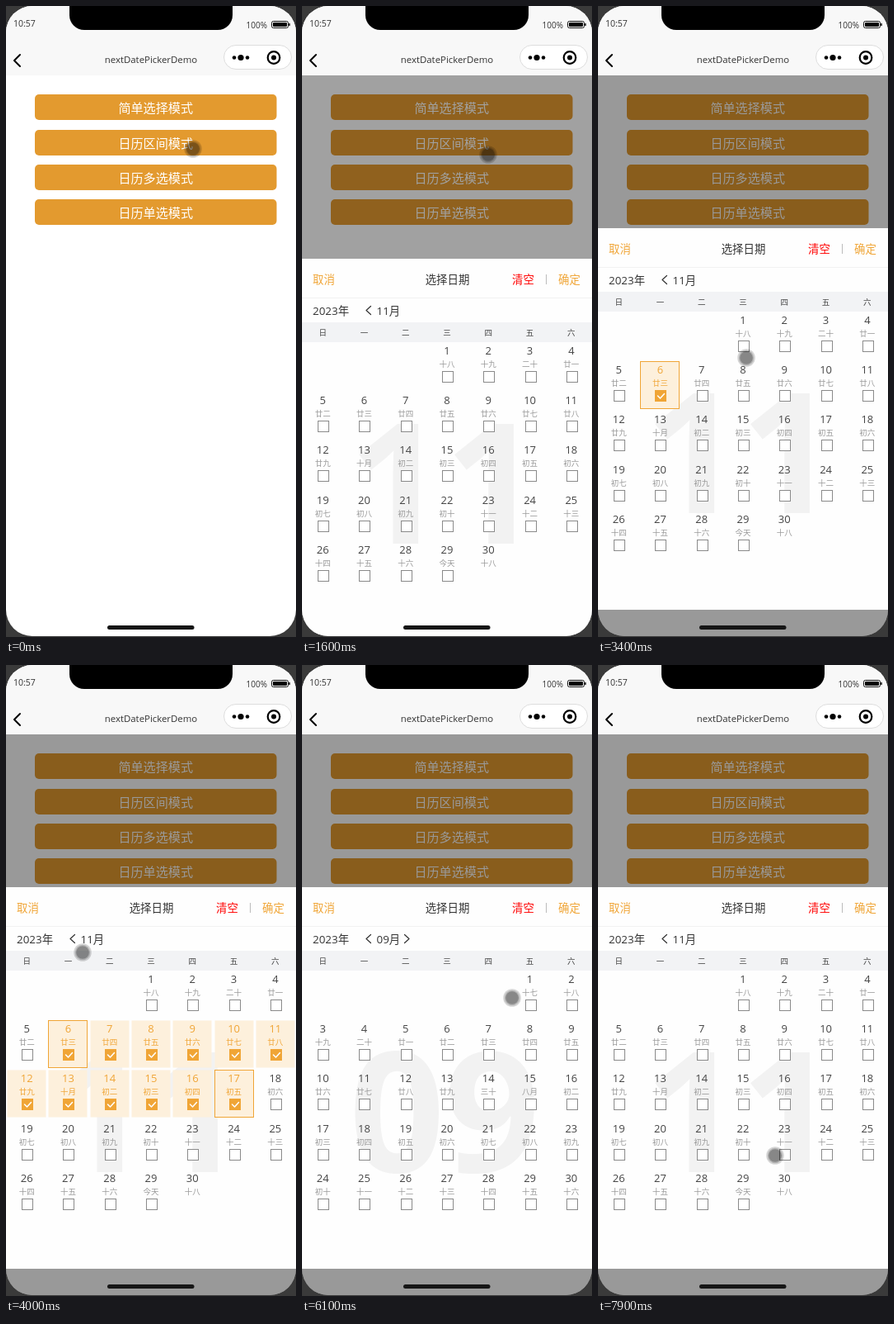
Animation of 352x764 px, one loop 8000 ms. Source, as an HTML page:

```html
<!DOCTYPE html>
<html lang="zh-CN">
<head>
<meta charset="utf-8">
<title>nextDatePickerDemo</title>
<style>
  html, body { margin: 0; width: 100%; height: 100%; overflow: hidden; background: #3a3a3a; }
  svg { display: block; width: 100vw; height: 100vh; }
  text { font-family: "Open Sans", "Noto Sans CJK SC", "Noto Sans CJK", sans-serif; fill: #333; }
  .mid { text-anchor: middle; }
  .btn { font-size: 15.1px; fill: #fff; }
  .act { font-size: 13.4px; }
  .week { font-size: 9.5px; fill: #444; }
  .day { font-size: 13px; fill: #444; }
  .lunar { font-size: 9.5px; fill: #999; }
  .mark { font-size: 203px; font-weight: 700; fill: #f2f2f2; }
  .box { fill: #fff; stroke: #8a8a8a; }
  .on .day, .on .lunar, .gold { fill: #f0a536; }
  .on .box { fill: #f0a536; stroke: #f0a536; }
  .clear { fill: #f00; font-weight: 500; }
  .cell { fill: #fdf0dc; }
  .end .cell { stroke: #f0a536; }
  .line { fill: none; stroke-linecap: round; stroke-linejoin: round; }
</style>
</head>
<body>
<svg viewBox="0 0 352 764" preserveAspectRatio="none">
  <defs><clipPath id="screen"><rect width="352" height="763" rx="32"/></clipPath></defs>
  <g clip-path="url(#screen)">
    <rect width="352" height="764" fill="#fff"/>
    <g id="buttons"></g>
    <rect id="shade" y="84" width="352" height="680" opacity="0"/>

    <g id="sheet">
      <rect y="269" width="352" height="462" fill="#fefefe"/>
      <text class="act gold" x="13" y="299">取消</text>
      <text class="act mid" x="176.5" y="298.5">选择日期</text>
      <text class="act clear" x="255" y="299">清空</text>
      <path d="M296.5 288v12" stroke="#bbb"/>
      <text class="act gold" x="311" y="299">确定</text>
      <path d="M0 316.5h352" stroke="#f2f2f2"/>
      <text class="act" x="13" y="337">2023年</text>
      <path class="line" d="M83.5 326.500l-5.500 5 5.500 5" stroke="#333" stroke-width="1.2"/>
      <text class="act" id="month" x="90.5" y="337"></text>
      <path class="line" id="next" d="M124.500 326.500l5.500 5-5.500 5" stroke="#333" stroke-width="1.2"/>
      <rect y="346" width="352" height="24" fill="#f2f3f5"/>
      <g id="weeks"></g>
      <text class="mark mid" id="mark" x="173" y="614"></text>
      <g id="days"></g>
    </g>

    <rect width="352" height="84" fill="#f8f8f8"/>
    <path d="M77 0h198v11a18 18 0 0 1-18 18H95a18 18 0 0 1-18-18z"/>
    <text x="9" y="25" font-size="10.5">10:57</text>
    <text x="291.5" y="27" font-size="10">100%</text>
    <rect x="322.5" y="18.5" width="20" height="8" rx="2" fill="none" stroke="#111"/>
    <rect x="324" y="20" width="17" height="5" rx="1"/>
    <path d="M344 21v3" stroke="#111" stroke-width="1.5"/>
    <path class="line" d="M17 59l-7 7 7 7" stroke="#000" stroke-width="2"/>
    <text class="mid" x="176" y="69" font-size="11.4">nextDatePickerDemo</text>
    <rect x="264.5" y="47.5" width="82" height="29" rx="14.5" fill="#fff" stroke="#ddd"/>
    <circle cx="277" cy="62.5" r="2.3"/>
    <circle cx="285" cy="62.5" r="3.6"/>
    <circle cx="293" cy="62.5" r="2.3"/>
    <circle cx="325" cy="62.5" r="7.3" fill="none" stroke="#000" stroke-width="2.2"/>
    <circle cx="325" cy="62.5" r="3"/>
    <rect x="123" y="750" width="105.5" height="5" rx="2.5" fill="#161616"/>

    <g id="cursor">
      <circle r="10.8" fill-opacity=".16"/>
      <circle r="9.2" fill-opacity=".16"/>
      <circle r="7.8" fill-opacity=".24"/>
    </g>
  </g>
</svg>
<script>
const LOOP = 8000, TICK = 100, COL = 352 / 7, ROW = 60.2;
const $ = id => document.getElementById(id);

// first weekday, day count, lunar date of day 1, length and following name of the lunar month
const months = {
  9: { first: 5, count: 30, lunar: 17, length: 30, name: '八月' },
  10: { first: 0, count: 31, lunar: 17, length: 30, name: '九月' },
  11: { first: 3, count: 30, lunar: 18, length: 29, name: '十月', today: 29 }
};

// time, x, y
const path = [
  [0, 227, 173], [100, 227, 172], [500, 227, 172], [600, 223, 179],
  [1000, 223, 179], [1100, 226, 180], [1600, 226, 180], [2100, 145, 455],
  [2200, 145, 455], [2300, 82, 466], [2600, 82, 466], [3000, 288, 540],
  [3100, 288, 540], [3400, 180, 426], [3800, 93, 348], [4000, 93, 348],
  [4200, 95, 345], [5100, 95, 345], [5700, 286, 449], [5900, 270, 411],
  [6000, 270, 411], [6100, 255, 403], [6500, 135, 339], [7500, 135, 339],
  [7900, 215, 594], [8000, 215, 594]
];

const text = (cls, x, y, s) => `<text class="${cls}" x="${x}" y="${y}">${s}</text>`;

$('buttons').innerHTML = ['简单选择模式', '日历区间模式', '日历多选模式', '日历单选模式']
  .map((s, i) => {
    const y = Math.round(107.3 + 42.3 * i);
    return `<rect x="35" y="${y}" width="293.5" height="31" rx="5" fill="#e39a2f"/>` +
      text('btn mid', 181.7, y + 22, s);
  }).join('');

$('weeks').innerHTML = [...'日一二三四五六']
  .map((s, i) => text('week mid', COL * (i + .5), 361.6, s)).join('');

function lunarName(day, m) {
  let n = m.lunar + day - 1;
  if (day === m.today) return '今天';
  if (n > m.length) n -= m.length;
  if (n === 1) return m.name;
  if (n === 20) return '二十';
  if (n === 30) return '三十';
  return '初十廿'[Math.floor((n - 1) / 10)] + '一二三四五六七八九十'[(n - 1) % 10];
}

function dayCell(day, m, from, to) {
  const slot = m.first + day - 1;
  const x = COL * (slot % 7 + .5), y = Math.round(380 + ROW * Math.floor(slot / 7));
  const on = day >= from && day <= to;
  const end = on && (day === from || day === to);
  const bx = Math.round(x) - 5.5, by = y + 25.5;
  let s = `<g class="${on ? 'on' : ''}${end ? ' end' : ''}">`;
  if (on) s += `<rect class="cell" x="${Math.round(x) - 23.5}" y="${y - 9.5}" width="47" height="57"/>`;
  s += text('day mid', x, y + 5, day) + text('lunar mid', x, y + 20.4, lunarName(day, m));
  if (!m.today || day <= m.today) s += `<rect class="box" x="${bx}" y="${by}" width="13" height="13"/>`;
  if (on) s += `<path class="line" d="M${bx + 3} ${by + 6.5}l3 3 5-5.5" stroke="#fff" stroke-width="1.5"/>`;
  return s + '</g>';
}

let shown = '';
function showMonth(n, from, to) {
  const key = [n, from, to].join();
  if (key === shown) return;
  shown = key;
  const m = months[n], label = String(n).padStart(2, '0');
  $('month').textContent = label + '月';
  $('mark').textContent = label;
  $('next').style.display = n === 11 ? 'none' : '';
  $('days').innerHTML = Array.from({ length: m.count }, (_, i) => dayCell(i + 1, m, from, to)).join('');
}

function cursorAt(t) {
  const i = path.findIndex(p => p[0] > t);
  const [t0, x0, y0] = path[i - 1], [t1, x1, y1] = path[i];
  const k = (t - t0) / (t1 - t0);
  return [x0 + (x1 - x0) * k, y0 + (y1 - y0) * k];
}

function draw(t) {
  const p = Math.min(1, Math.max(0, (t - 1400) / 300));
  const open = 1 - Math.pow(1 - p, 2.36);
  $('sheet').setAttribute('transform', `translate(0 ${Math.round(495 * (1 - open))})`);
  $('shade').setAttribute('opacity', .4 * open);

  const month = t < 4400 ? 11 : t < 4900 ? 10 : t < 7100 ? 9 : t < 7500 ? 10 : 11;
  const picked = t >= 2500 && t < 4400;
  showMonth(month, picked ? 6 : 0, picked ? (t < 3500 ? 6 : 17) : 0);
  $('cursor').setAttribute('transform', `translate(${cursorAt(t)})`);
}

// the screen refreshes ten times a second
const start = performance.now();
function frame(now) {
  const t = Math.max(0, now - start) % LOOP;
  draw(Math.floor(t / TICK) * TICK);
  requestAnimationFrame(frame);
}
draw(0);
requestAnimationFrame(frame);
</script>
</body>
</html>
```
